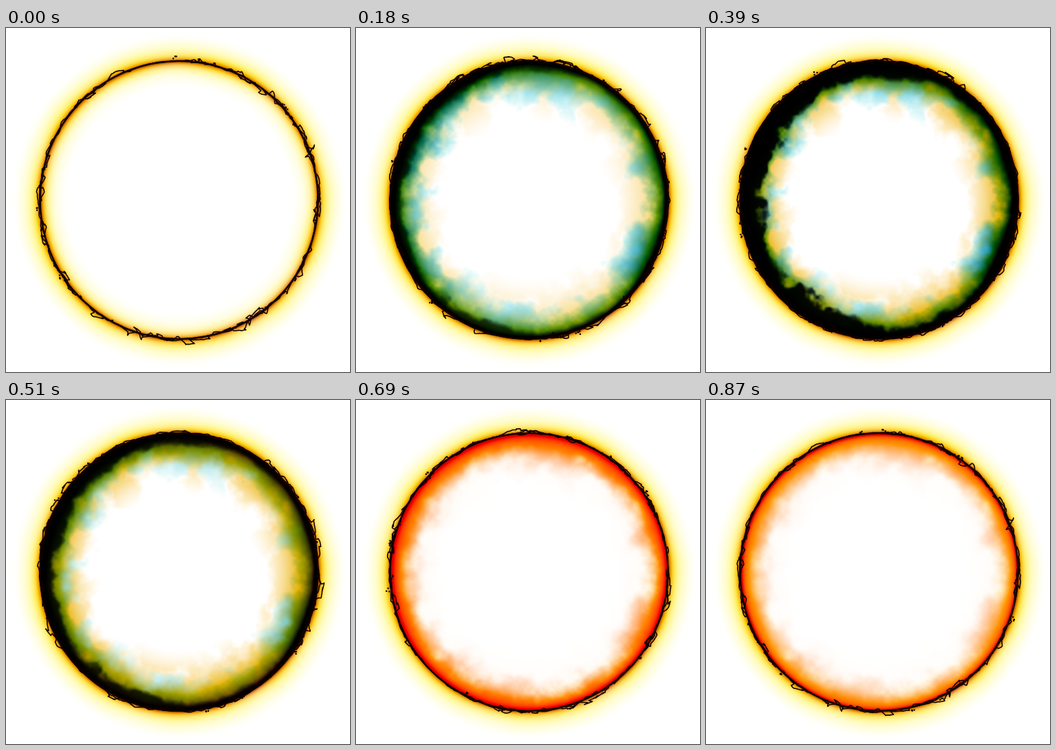
Recreate the animation shown at these times as an HTML page with a canvas. Size 500 by 500 pixels, loop 0.9 s.

```html
<!DOCTYPE html>
<html>
<head>
<meta charset="utf-8">
<style>
html, body { margin: 0; width: 100%; height: 100%; overflow: hidden; background: #fff; }
canvas { display: block; }
</style>
</head>
<body>
<canvas id="stage" width="500" height="500"></canvas>
<script>
const SIZE = 500, CX = 251.5, CY = 250, R = 202, LOOP = 900, STEP = 30;
const ctx = document.getElementById('stage').getContext('2d');
const img = ctx.createImageData(SIZE, SIZE);
img.data.fill(255);

const clamp = v => Math.max(0, Math.min(1, v));
const mix = (a, b, u) => a + (b - a) * u;
const ease = u => u * u * (3 - 2 * u);

function hash(x, y, s) {
  const v = Math.sin(x * 127.1 + y * 311.7 + s * 74.7) * 43758.5453;
  return v - Math.floor(v);
}
function noise(x, y, s) {
  const i = Math.floor(x), j = Math.floor(y), u = ease(x - i), v = ease(y - j);
  return mix(mix(hash(i, j, s), hash(i + 1, j, s), u),
             mix(hash(i, j + 1, s), hash(i + 1, j + 1, s), u), v);
}
function cloud(x, y, s) {
  let sum = 0;
  for (let o = 0, w = .5, f = 1 / 34; o < 4; o++, w /= 2, f *= 2) sum += w * noise(x * f, y * f, s + o);
  return clamp((sum / .94 - .5) * 2.1 + .5);
}

// Strengths at the twelve clock directions, starting at the top
const DARK = [20, 13, 9, 13, 12, 17, 20, 32, 24, 34, 30, 28];
const CYAN = [.85, .7, .85, .9, 1, .7, .75, .75, 1.05, 1.05, 1.3, 1.2];
function around(list, h) {
  const i = Math.floor(h);
  return mix(list[i % 12], list[(i + 1) % 12], ease(h - i));
}

// Time, then the strength of yellow, cyan, dark and fire
const KEYS = [
  [0, 0, 0, 0, 0], [180, .75, .85, .5, 0], [300, .95, 1.25, 1, 0], [390, 1.15, 1, .95, 0],
  [510, 1.15, .6, .62, .15], [690, .12, 0, 0, 1.1], [900, .08, 0, 0, .72]
];
function levels(t) {
  const k = KEYS.findIndex(key => key[0] > t), a = KEYS[k - 1], b = KEYS[k];
  return a.map((v, i) => mix(v, b[i], (t - a[0]) / (b[0] - a[0]))).slice(1);
}

// Everything about a pixel that does not change with time
const pixels = [];
for (let y = 0; y < SIZE; y++) for (let x = 0; x < SIZE; x++) {
  const dx = x - CX, dy = y - CY, depth = R - Math.hypot(dx, dy);
  if (depth < -42 || depth > 95) continue;
  const h = (Math.atan2(dx, -dy) / Math.PI * 6 + 12) % 12;
  const n = cloud(x, y, 1), m = cloud(x, y, 20), d = Math.abs(depth);
  const p = { at: (y * SIZE + x) * 4, inside: depth > 0 };
  p.halo = Math.exp(-d / (p.inside ? 9 : 11)) * (.75 + .5 * noise(x / 60, y / 60, 7)) * clamp((42 - d) / 14);
  p.core = Math.exp(-d / 3.6);
  if (p.inside) {
    // Yellow fills the gaps between the cyan patches
    const gap = clamp(1.1 - .75 * n + .6 * (m - .5));
    p.yellow = clamp(1 - depth / (28 + 62 * gap));
    p.cyan = 1.6 * clamp(1 - depth / (28 + 52 * n)) ** 1.3 * around(CYAN, h);
    p.thick = around(DARK, h) * (.5 + n);
    p.depth = depth;
    p.fire = Math.exp(-((depth / (16 + 18 * n)) ** 2));
  }
  pixels.push(p);
}

function paintGlow(t) {
  const [yellow, cyan, dark, fire] = levels(t), data = img.data;
  for (const p of pixels) {
    let r = 1 - .6 * p.core ** 2, g = 1 - .85 * p.core - .06 * p.halo, b = 1 - 1.3 * p.halo;
    if (p.inside) {
      const Y = p.yellow * yellow, C = p.cyan * cyan, F = p.fire * fire;
      const shade = 1 - .94 * clamp(dark * 1.4) * ease(clamp((p.thick * dark - p.depth + 5) / 11));
      r = clamp(r - .2 * Y ** 3 - .95 * C) * shade;
      g = clamp(g - .08 * Y - .35 * Y * Y - .2 * C - .25 * C * C - .62 * F) * shade;
      b = clamp(b - .25 * Y - 1.1 * Y * Y - .2 * C - 1.05 * F) * shade;
    }
    data[p.at] = 255 * r;
    data[p.at + 1] = 255 * g;
    data[p.at + 2] = 255 * b;
  }
  ctx.putImageData(img, 0, 0);
}

function drawWires(t) {
  const beat = t / 180, k = Math.floor(beat), u = ease(beat - k);
  const live = (i, s) => mix(hash(i, k % 5, s), hash(i, (k + 1) % 5, s), u);
  const place = (a, r) => [CX + r * Math.sin(a), CY - r * Math.cos(a)];
  // Random value along the ring that changes every few degrees
  const wave = (deg, period, s) => {
    const c = Math.floor(deg / period);
    return mix(live(c, s), live((c + 1) % (360 / period), s), ease(deg / period - c));
  };

  ctx.strokeStyle = ctx.fillStyle = '#100';
  ctx.lineJoin = 'round';
  ctx.lineWidth = 2.2;
  ctx.beginPath();
  ctx.arc(CX, CY, R, 0, 7);
  ctx.stroke();

  ctx.lineWidth = 1.6;
  for (let s = 40; s < 43; s++) {
    ctx.beginPath();
    for (let i = 0; i < 360; i += .5) {
      const burst = wave(i, 8, s) ** 2.5;
      const a = (i + (wave(i, 1, s + 10) - .5) * 5 * burst) * Math.PI / 180;
      ctx.lineTo(...place(a, R + burst * (20 * (wave(i, 3, s + 30) - .42) + 6 * (wave(i, 1, s + 20) - .5))));
    }
    ctx.closePath();
    ctx.stroke();
  }

  // Knots and loose sparks
  for (let i = 0; i < 16; i++) {
    const a = hash(i, k % 5, 90) * 2 * Math.PI, off = (live(i, 91) - .4) * 14;
    for (let j = 0; j < 3; j++) {
      const [x, y] = place(a + (hash(i, j, 92) - .5) * .03, R + off * (.3 + hash(j, i, 93) * .7));
      ctx.fillRect(x - 1, y - 1, 2.2, 2.2);
    }
  }
}

let shown = -1;
function tick() {
  const t = Math.floor(performance.now() % LOOP / STEP) * STEP;
  if (t !== shown) {
    shown = t;
    paintGlow(t);
    drawWires(t);
  }
  requestAnimationFrame(tick);
}
tick();
</script>
</body>
</html>
```
